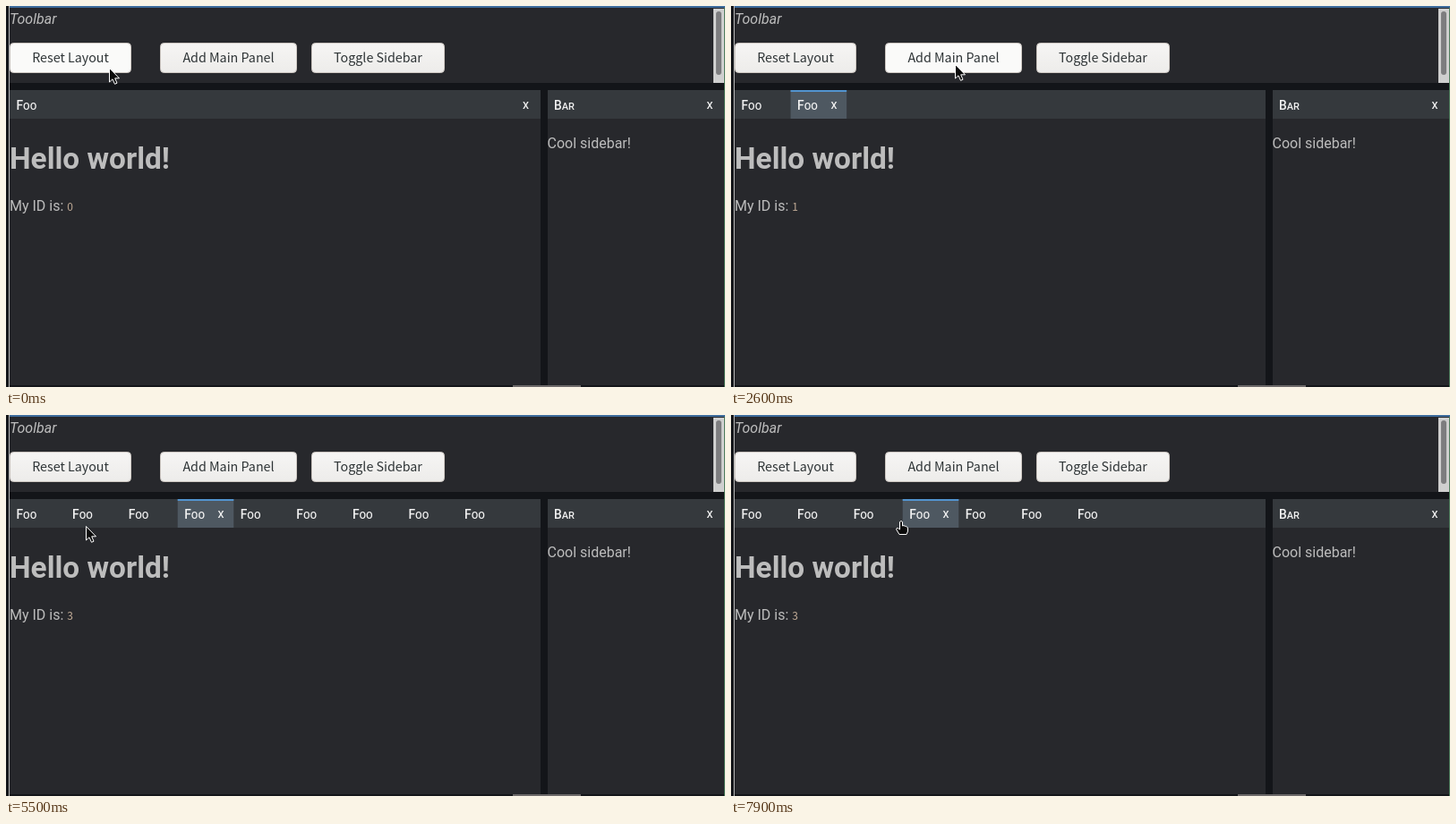
Recreate the animation shown at these times as an HTML page. Size 803 by 426 pixels, loop 8000 ms.

```html
<!DOCTYPE html>
<html lang="en">
<head>
<meta charset="utf-8">
<title>Dock layout</title>
<style>
html, body { margin: 0; width: 100%; height: 100%; overflow: hidden; background: #131519; }
svg { display: block; width: 803px; height: 426px; }
text { font-family: Roboto, sans-serif; font-size: 16px; fill: #bdbdbd; white-space: pre; }
.button text { font-family: "Noto Sans CJK JP", "Noto Sans CJK SC", "Noto Sans CJK", "Noto Sans", sans-serif; font-size: 14.29px; fill: #2e3436; text-anchor: middle; }
.tab { font-size: 13.8px; font-weight: 500; fill: #f2f2f2; }
.tab tspan, .close { font-size: 11px; }
.close { font-weight: 500; fill: #f2f2f2; text-anchor: middle; }
#id { font-family: "Noto Sans CJK JP", "Noto Sans CJK SC", "Noto Sans CJK", "Noto Sans", sans-serif; font-size: 12px; fill: #c0ab96; }
</style>
</head>
<body>
<svg viewBox="0 0 803 426">
  <defs>
    <linearGradient id="face" x2="0" y2="1">
      <stop stop-color="#f6f5f4"/><stop offset="1" stop-color="#edecea"/>
    </linearGradient>
  </defs>
  <rect width="803" height="426" fill="#131519"/>
  <rect x="4" y="2" width="798" height="84" fill="#27282c"/>
  <rect x="4" y="94" width="593" height="330" fill="#27282c"/>
  <rect x="605" y="94" width="197" height="330" fill="#27282c"/>
  <rect x="4" y="94" width="593" height="32" fill="#35393d"/>
  <rect x="605" y="94" width="197" height="32" fill="#35393d"/>
  <rect x="3" width="800" height="2" fill="#3e6c9c"/>
  <rect x="790" y="3" width="12" height="83" fill="#cfcfcf"/>
  <rect x="793" y="6" width="6" height="71" rx="3" fill="#7d7d7f"/>
  <rect x="566" y="424" width="76" height="2" fill="#6d6a6a"/>
  <rect x="3" width="1" height="426" fill="#b9b9b9"/>
  <rect x="802" y="2" width="1" height="424" fill="#4e7d5c"/>
  <text x="4" y="20" font-style="italic">Toolbar</text>
  <g id="buttons"></g>
  <g id="tabs"></g>
  <text class="tab" x="612" y="115.5">B<tspan>AR</tspan></text>
  <text class="close" x="786" y="115">X</text>
  <text x="604.5" y="159">Cool sidebar!</text>
  <text x="4" y="181.5" style="font-size:33.4px;font-weight:700">Hello world!</text>
  <text x="4" y="229">My ID is: <tspan id="id"></tspan></text>
  <g id="cursor" fill="#0b0b0b" stroke="#fff" stroke-linejoin="round">
    <path id="arrow" d="M.5 .5V16L4 12.8 6.5 18.3 9 17.2 6.7 11.8H11.5Z"/>
    <path id="hand" d="M-1.5 7V.5Q0-1.5 1.5 .5V5Q3 4 4.3 5.3 5.7 4.9 6.3 6.2 7.5 6.2 7.5 8V11L6 14.5H-2L-5.3 9Q-5.5 7-3.5 7.5L-1.5 9Z"/>
  </g>
</svg>
<script>
const LOOP = 8000, STEP = 100;
const PITCH = 62.57, TAB_LEFT = 4, TAB_TOP = 94, TAB_H = 32;
const el = id => document.getElementById(id);

const buttons = [
  { label: "Reset Layout", x: 4, w: 136 },
  { label: "Add Main Panel", x: 172, w: 153 },
  { label: "Toggle Sidebar", x: 341, w: 149 }
];

// Pointer stops: time, x, y
const path = [
  [0, 115, 69], [300, 115, 69], [900, 300, 300], [1200, 308, 65], [1800, 250, 65],
  [4500, 250, 65], [4900, 215, 112], [5100, 215, 112], [5400, 120, 133], [5500, 89, 124],
  [5700, 88, 114], [5900, 88, 114], [6400, 280, 115], [6500, 281, 115], [6800, 303, 113],
  [7300, 303, 113], [7900, 190, 119]
];

const addTimes = [2400, 2800, 3100, 3400, 3600, 3900, 4100, 4400];
const events = [
  ...addTimes.map(t => [t, "add"]),
  [5000, "select", 3], [5800, "select", 1], [6500, "select", 4],
  [6900, "close", 4], [7200, "close", 4]
];

function pointer(t) {
  const i = path.findIndex(p => p[0] > t);
  if (i < 0) return path.at(-1).slice(1);
  const [t0, x0, y0] = path[Math.max(i - 1, 0)], [t1, x1, y1] = path[i];
  const u = Math.max(0, (t - t0) / (t1 - t0)), e = u * u * (3 - 2 * u);
  return [x0 + (x1 - x0) * e, y0 + (y1 - y0) * e];
}

function layout(t) {
  const ids = [0];
  let active = 0;
  for (const [at, kind, index] of events) {
    if (at > t) break;
    if (kind === "add") active = ids.push(ids.length) - 1;
    if (kind === "select") active = index;
    if (kind === "close") {
      ids.splice(index, 1);
      if (active >= index) active = index - 1;
    }
  }
  return { ids, active };
}

const inside = ([px, py], x, y, w, h) => px >= x && px < x + w && py >= y && py < y + h;

function drawButton({ label, x, w }, hovered, pressed) {
  const fill = pressed ? "#d6d1cd" : hovered ? "#fafaf9" : "url(#face)";
  const ring = pressed
    ? `<rect x="${x + 3.5}" y="44.5" width="${w - 7}" height="27" rx="2" fill="none" stroke="#b9b1a9"/>` : "";
  return `<g class="button"><rect x="${x + .5}" y="41.5" width="${w - 1}" height="33" rx="4" fill="${fill}" stroke="#cdc7c2"/>
    ${ring}<text x="${x + w / 2 + (pressed ? 1 : 0)}" y="63">${label}</text></g>`;
}

function drawTab(i, alone, active, hovered) {
  const x = TAB_LEFT + PITCH * i, lit = !alone && (active || hovered);
  const [fill, edge] = active ? ["#4e5861", "#5294cf"] : ["#42484f", "#3d6c9b"];
  const back = lit
    ? `<rect x="${x}" y="${TAB_TOP}" width="${PITCH}" height="${TAB_H}" fill="${fill}"/>
       <rect x="${x}" y="${TAB_TOP}" width="${PITCH}" height="2" fill="${edge}"/>` : "";
  const close = alone || lit
    ? `<text class="close" x="${alone ? 580.5 : x + 48.3}" y="115">X</text>` : "";
  return `${back}<text class="tab" x="${x + 7.5}" y="115.5">F<tspan>OO</tspan></text>${close}`;
}

function render(t) {
  const { ids, active } = layout(t);
  const [px, py] = pointer(t);
  const seen = pointer(t - STEP); // hover styles trail the pointer by one step
  const pressed = addTimes.includes(t + STEP);
  const alone = ids.length === 1;

  el("buttons").innerHTML = buttons.map((b, i) =>
    drawButton(b, inside(seen, b.x, 41, b.w, 34), pressed && i === 1)).join("");

  let onClose = false;
  el("tabs").innerHTML = ids.map((_, i) => {
    const x = TAB_LEFT + PITCH * i;
    onClose ||= !alone && inside([px, py], x + 37, TAB_TOP, PITCH - 37, TAB_H);
    return drawTab(i, alone, i === active, inside(seen, x, TAB_TOP, PITCH, TAB_H));
  }).join("");

  el("id").textContent = ids[active];
  el("cursor").setAttribute("transform", `translate(${Math.round(px)} ${Math.round(py)})`);
  el("arrow").style.display = onClose ? "none" : "";
  el("hand").style.display = onClose ? "" : "none";
}

const start = performance.now();
let shown = -1;
function tick() {
  const t = Math.floor(((performance.now() - start) % LOOP) / STEP) * STEP;
  if (t !== shown) render(shown = t);
  requestAnimationFrame(tick);
}
tick();
</script>
</body>
</html>
```
